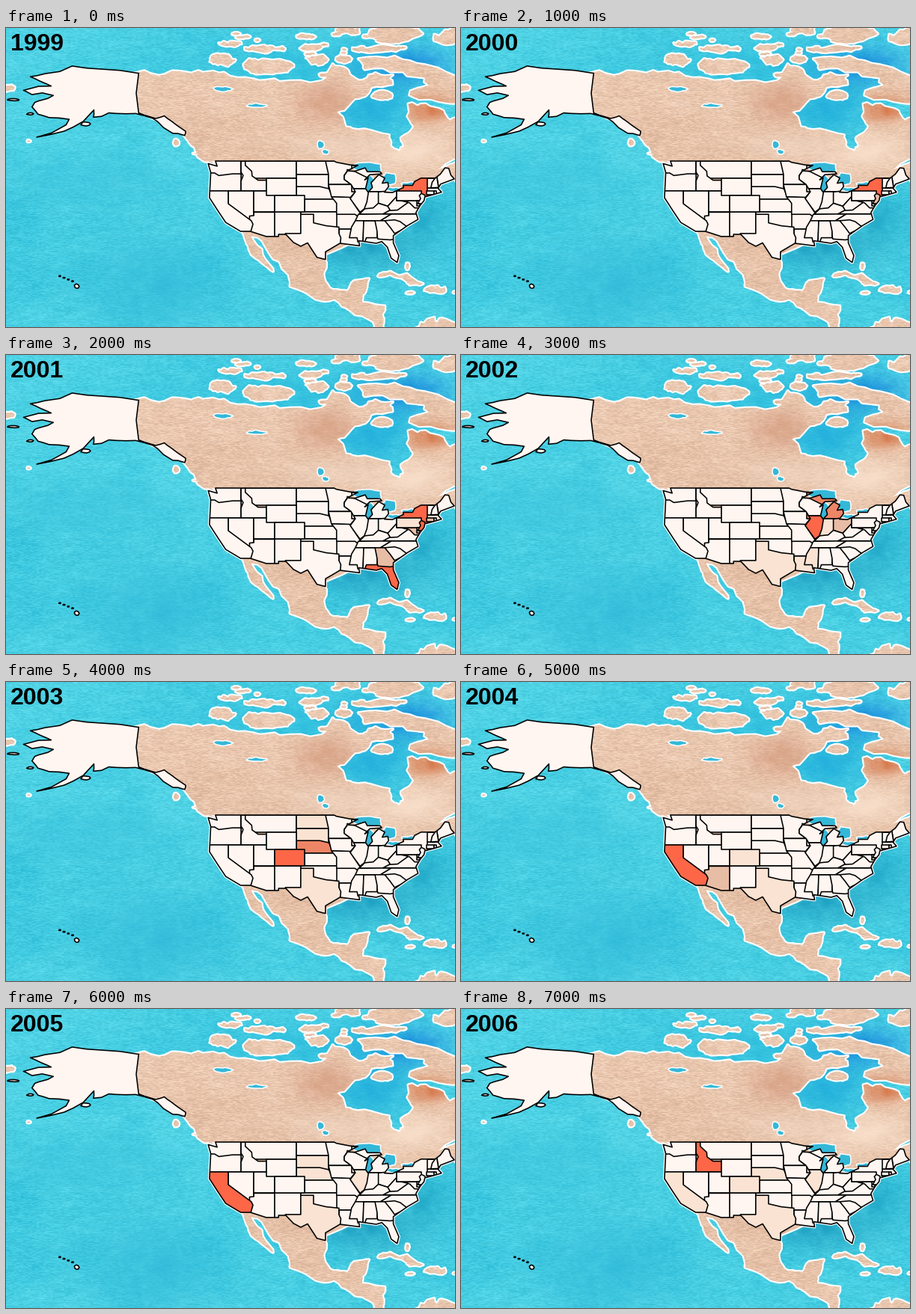
These frames come from a looping animation (600 px wide and 400 px high, 8 s). A matplotlib script:

```python
import numpy as np
import matplotlib.pyplot as plt
from matplotlib.animation import FuncAnimation
from matplotlib.patches import Polygon
from matplotlib.path import Path

W, H, DPI = 600, 400, 100
PX = 72 / DPI
SCALE = 5.7  # pixels per degree, both ways
rng = np.random.default_rng(7)

BASE, LIGHT, TAN, CORAL, RED = "#fff6f1", "#fae3d3", "#e8bda5", "#ee8566", "#fd6747"
YEARS = [
    (1999, {RED: "NY"}),
    (2000, {RED: "NY", TAN: "NJ"}),
    (2001, {RED: "NY NJ FL", TAN: "GA CT MD", LIGHT: "PA MA"}),
    (2002, {RED: "IL", CORAL: "MI", TAN: "OH", LIGHT: "IN LA MS TX"}),
    (2003, {RED: "CO", CORAL: "NE", LIGHT: "SD ND TX"}),
    (2004, {RED: "CA", TAN: "AZ", LIGHT: "CO TX"}),
    (2005, {RED: "CA", LIGHT: "IL SD TX NE"}),
    (2006, {RED: "ID", LIGHT: "TX CO CA NE IL"}),
]

fig = plt.figure(figsize=(W / DPI, H / DPI), dpi=DPI)
ax = fig.add_axes([0, 0, 1, 1])


def project(*coords):
    """Degrees west and north, in pairs, to stage pixels."""
    west, north = np.reshape(coords, (-1, 2)).T
    return np.column_stack([SCALE * (172.1 - west), 178 + SCALE * (49 - north)])


def oval(west, north, rx, ry, n=9):
    """Uneven ellipse around a place, in stage pixels."""
    a = np.linspace(0, 2 * np.pi, n, endpoint=False)
    r = rng.uniform(0.8, 1.15, n)
    ring = np.column_stack([rx * r * np.cos(a), ry * r * np.sin(a)])
    return project(west, north) + SCALE * ring


def roughen(p, levels=2, size=0.15, limit=2.5):
    """Closed outline with its edges split and shaken, wound one way."""
    x, y = p.T
    if np.sum(x * np.roll(y, -1) - y * np.roll(x, -1)) < 0:
        p = p[::-1]
    for _ in range(levels):
        step = np.roll(p, -1, axis=0) - p
        reach = np.minimum(np.hypot(*step.T) * size, limit)
        mid = p + step / 2 + rng.normal(0, 0.7, p.shape) * reach[:, None]
        p = np.stack([p, mid], axis=1).reshape(-1, 2)
    return p


def noise(rows, cols):
    """Smooth random field in 0..1 over the stage."""
    grid = rng.random((rows, cols))
    x, y = np.linspace(0, cols - 1, W), np.linspace(0, rows - 1, H)
    wide = np.array([np.interp(x, np.arange(cols), r) for r in grid])
    return np.array([np.interp(y, np.arange(rows), c) for c in wide.T]).T


yy, xx = np.mgrid[0:H, 0:W]


def stain(img, x, y, rx, ry, color, strength):
    a = strength * np.exp(-((xx - x) / rx) ** 2 - ((yy - y) / ry) ** 2)
    a = (a * (0.7 + 0.6 * noise(40, 60)))[..., None]
    img[:] = img * (1 - a) + np.array(color) * a


def wash(dark, light, grain):
    t = (0.4 * noise(6, 8) + 0.3 * noise(20, 18) + 0.3 * noise(90, 45))[..., None]
    img = np.array(dark) * (1 - t) + np.array(light) * t
    return img + ((noise(H, 200) - 0.5) * grain)[..., None]


def show(img, z):
    return ax.imshow(np.clip(img, 0, 255).astype(np.uint8), extent=(0, W, H, 0),
                     interpolation="nearest", aspect="auto", zorder=z)


sea = wash((50, 194, 220), (96, 220, 234), 24)
stain(sea, 110, 205, 130, 35, (52, 190, 218), 0.4)
stain(sea, 200, 345, 90, 60, (46, 184, 216), 0.6)
stain(sea, 480, 295, 65, 28, (16, 146, 184), 0.6)
stain(sea, 555, 255, 40, 35, (24, 160, 194), 0.6)
stain(sea, 490, 105, 55, 35, (24, 168, 218), 0.7)
stain(sea, 530, 50, 60, 25, (10, 110, 220), 0.6)
stain(sea, 400, 50, 120, 35, (30, 180, 218), 0.5)
show(sea, 0)

ground = wash((222, 182, 154), (242, 212, 191), 30)
stain(ground, 565, 108, 34, 16, (212, 112, 64), 0.75)
stain(ground, 428, 100, 40, 26, (208, 146, 116), 0.6)
stain(ground, 540, 165, 65, 28, (250, 226, 206), 0.8)
stain(ground, 430, 155, 60, 18, (244, 220, 202), 0.5)
show_ground = show(ground, 2)

outlines = []


def land(points):
    shape = Polygon(roughen(points), fc="white", ec="white", lw=4.2 * PX,
                    joinstyle="round", zorder=1)
    ax.add_patch(shape)
    outlines.append(shape.get_path())


arctic = [142, 69.6, 135, 69.3, 127, 70.2, 121, 69.8, 114, 68.2, 108, 67.6, 98, 67.8,
          95.5, 71.8, 92.2, 70.6, 91, 68.9, 88, 68.2, 85.5, 69.7, 81.4, 69.2, 81.5, 67, 86.5, 66.3]
bay = [88, 64.2, 91, 63, 94.5, 60.5, 92.5, 57, 88, 56.5, 82.3, 55.1, 82, 52.9, 80, 51.3,
       78.8, 52.5, 79.3, 54.6, 76.5, 57, 78, 59.5, 77.8, 62.4, 73.7, 62.4, 69.6, 60.8,
       68, 58.5, 65, 60.2, 62, 56]
east = [60, 50, 67, 49.6, 71, 47, 66, 49, 62, 48, 62, 44.8, 66, 43.8, 67, 45,
        78, 40, 82, 34, 97.6, 27]
gulf = [97.4, 25.9, 97.5, 21.5, 95.5, 18.8, 92, 18.5, 90.5, 20.9, 87, 21.4, 88.5, 17.5,
        88.5, 15.8, 83.3, 15, 83.6, 11, 82, 9]
pacific = [85.5, 9, 86, 11.3, 91.5, 14, 94.5, 16.2, 98, 16.2, 105.5, 19.6, 105.8, 22.3,
           109.4, 26, 113.1, 31.2, 114.7, 31.7, 112, 27, 109.5, 23.1, 112.2, 25.2,
           115, 28, 115.8, 30, 117, 32.6, 122, 40, 123, 49, 127.5, 51, 130.2, 54.8,
           133.5, 58.5, 142, 60.5]
land(project(*arctic, *bay, *east, *gulf, *pacific))
# Baffin, Cuba, Vancouver, the Venezuelan coast
land(project(89.5, 73, 81, 73.6, 74, 71.6, 67, 69, 61, 66, 67, 66.4, 64, 62.8, 68, 62.6,
             77.5, 64.5, 73, 66.8, 74, 68.6, 79, 70, 88, 70.5))
land(project(84.9, 22, 82, 23.1, 77, 21.6, 74.3, 20.2, 77.5, 19.9, 78.3, 20.8, 82, 22.4))
land(project(128.3, 50.8, 125.3, 50.1, 123.4, 48.5, 125.5, 48.9))
land(project(77, 9, 74.8, 11.1, 71.7, 12.3, 71.2, 11, 70, 12.1, 65, 10.5, 65, 9))
for place in [(121.5, 72.8, 2.9, 1.3), (110.5, 71.1, 6, 1.9), (99, 72.8, 2.6, 1.1),
              (97.5, 69.2, 1.3, 0.5), (93, 73, 2, 0.9), (86, 75.3, 5.5, 0.8),
              (81, 78.9, 6, 2.3), (92, 79.7, 3.2, 1), (111, 75.4, 5, 0.7),
              (119.5, 76.5, 2.8, 0.6), (100.5, 75.7, 2.6, 0.7), (102, 78.2, 2.2, 0.5),
              (66.5, 78, 5, 1.9), (83.8, 64.5, 2.6, 1), (132.2, 53.4, 0.6, 0.8),
              (171.6, 66.1, 1.7, 0.7), (166.8, 53.7, 0.4, 0.2), (71.4, 18.9, 2.8, 0.8),
              (77.3, 18.1, 1, 0.3), (66.5, 18.2, 0.8, 0.25), (78, 24.3, 0.4, 0.8)]:
    land(oval(*place))
for _ in range(14):
    land(oval(rng.uniform(75, 120), rng.uniform(74, 79), rng.uniform(0.4, 1.2), 0.3))
show_ground.set_clip_path(Path.make_compound_path(*outlines), ax.transData)

# Great Lakes, then lakes of the north-west
for place in [(87.5, 47.5, 4, 1.1), (87, 43.7, 1.2, 2.2), (82.3, 44.8, 1.6, 1.6),
              (81, 42.3, 2, 0.6), (77.8, 43.6, 1.7, 0.4), (98.3, 52.8, 0.8, 1),
              (97.2, 51.2, 0.8, 0.6), (113.3, 62, 2.8, 0.4), (121.2, 65.9, 2.4, 0.6)]:
    ax.add_patch(Polygon(roughen(oval(*place), 1), fc="#34b8d8", ec="white",
                         lw=1.5 * PX, zorder=3))

states = {}
INK = dict(ec="black", lw=1.6 * PX, joinstyle="round")


def state(key, points, clip=None):
    """Later states cover the loose edges of earlier ones."""
    shape = ax.add_patch(Polygon(points, fc=BASE, zorder=4, **INK))
    if clip is not None:
        shape.set_clip_path(clip, ax.transData)
    states.setdefault(key, []).append(shape)


alaska = [141, 69.6, 150, 70.6, 156.6, 71.3, 163, 69.5, 166.4, 68.8, 164, 67.7, 161.5, 66.6,
          168, 65.6, 166, 64.6, 161, 64.4, 164.5, 63.1, 166, 61.7, 164.6, 60, 162, 59.2,
          157.3, 58.8, 158, 57.5, 164.9, 54.6, 158.5, 56, 154, 58.3, 151.5, 61, 151.6, 59.3,
          148, 60.3, 144, 60.1, 139.5, 59.6, 136.5, 58.2, 133, 55.5, 130.2, 55, 130, 56,
          133.5, 58.5, 135, 59.6, 137, 59, 141, 60.3]
state("AK", roughen(project(*alaska), 1, 0.08))
for place in [(153.4, 57.7, 1.1, 0.5), (170.3, 63.4, 1.4, 0.25), (166.4, 60.1, 0.8, 0.25)]:
    state("AK", oval(*place))
state("HI", oval(155.5, 19.6, 0.6, 0.6, 7))
for i in range(4):
    state("HI", oval(156.5 + i, 20.8 + 0.4 * i, 0.25, 0.12, 6))

north = [123, 49, 95.2, 49, 94.6, 48.7, 91.5, 48.1, 89.6, 48, 92.1, 46.7, 90.4, 46.6,
         87.9, 47.4, 87.4, 46.5, 84.4, 46.5, 84, 46, 86.8, 45.8, 88, 44.6, 87.2, 45.1,
         87.8, 42.5, 87.2, 41.7, 86.2, 42.8, 86.5, 43.9, 85.5, 45, 84.7, 45.8, 83.3, 45,
         83.9, 43.8, 82.6, 44, 82.4, 43, 83.4, 41.7, 81.5, 41.6, 78.9, 42.8, 79, 43.3,
         76.8, 43.3, 76.3, 44.2, 74.8, 45, 71.5, 45, 70.3, 45.9, 69.2, 47.4, 68.3, 47.3,
         67.8, 45.7]
atlantic = [67, 44.8, 70.2, 43.6, 70.8, 42.6, 70, 41.7, 72, 41.1, 73.9, 40.6, 74.1, 39.7,
            75, 38.6, 76, 36.9, 75.5, 35.3, 77.9, 33.9, 81.3, 31.5, 81.3, 29.8, 80, 26.8,
            80.4, 25.2, 81.8, 26.2, 82.7, 28.8, 84, 30.1, 85.3, 29.7, 89.4, 30.3, 89.2, 29.1]
south = [93.8, 29.7, 97.2, 27.7, 97.2, 25.9, 99.2, 26.4, 101.4, 29.8, 103, 29, 104.7, 29.9,
         106.5, 31.8, 108.2, 31.8, 108.2, 31.3, 111.1, 31.3, 114.8, 32.5, 117.1, 32.5,
         120.6, 34.6, 122.4, 37.3, 124.4, 40.4, 124.1, 46.3, 124.7, 48.4, 122.6, 47.8]
border = project(*north, *atlantic, *south)
ax.add_patch(Polygon(border, fc="white", ec="white", lw=4 * PX, joinstyle="round", zorder=1))
ax.add_patch(Polygon(border, fc="none", zorder=5, **INK))
country = Path(border)


def inner(key, *coords):
    state(key, project(*coords), country)


def box(key, west, top, right, bottom):
    inner(key, west, top, right, top, right, bottom, west, bottom)


# West
box("WA", 126, 50, 117, 45)
box("MT", 117, 49, 104, 45)
inner("OR", 126, 46.2, 123.2, 46.2, 122.2, 45.6, 119, 46, 117, 46, 117, 42, 126, 42)
inner("ID", 117, 49, 116, 49, 116, 48, 114.5, 46.6, 114.4, 45.5, 113, 44.5, 111, 44.5,
      111, 42, 117, 42, 117, 44.3, 116.5, 45.6, 117, 46.4)
box("NV", 120, 42, 114, 35)
box("UT", 114, 42, 109.05, 37)
inner("AZ", 114, 37, 109.05, 37, 109.05, 31, 115, 31, 115, 36.1, 114, 36.2)
inner("CA", 126, 42, 120, 42, 120, 39, 114.6, 35, 114.2, 34.2, 114.7, 32.5, 118, 31, 126, 34)
# Plains
box("ND", 104, 49, 96.5, 45.9)
box("SD", 104, 45.9, 96.5, 42)
inner("NE", 104, 43, 98.5, 43, 96.4, 42.5, 95.3, 40, 104, 40)
box("WY", 111, 45, 104, 41)
box("KS", 102.05, 40, 94.6, 37)
box("NM", 109.05, 37, 103, 31)
box("OK", 103, 37, 94.45, 33)
box("CO", 109.05, 41, 102.05, 37)
inner("MN", 97.2, 49, 96.5, 45.9, 96.5, 43.5, 91.2, 43.5, 92.8, 44.7, 92.8, 45.6,
      92.1, 46.7, 89, 48, 92, 49)
inner("IA", 96.5, 43.5, 91.2, 43.5, 90.2, 41.8, 91.4, 40.4, 95.8, 40.6)
box("AR", 94.5, 36.5, 89.7, 33)
inner("MO", 95.8, 40.6, 91.5, 40.5, 90.2, 38.5, 89.1, 36.8, 89.6, 36, 90.3, 36.5,
      94.6, 36.5, 94.6, 39.1)
box("LA", 94.05, 33, 88.5, 28)
inner("TX", 103, 36.5, 100, 36.5, 100, 34.5, 97, 33.8, 94.05, 33.5, 94.05, 32, 93.6, 31,
      93.8, 29, 97, 25, 107, 29, 106.6, 32, 103, 32)
# Middle
box("MI", 91, 48, 82, 41.75)
inner("WI", 92.1, 47, 90.4, 46.6, 87.6, 45.2, 86.5, 45.2, 87, 42.5, 90.6, 42.5,
      91.2, 43.5, 92.8, 44.7, 92.8, 45.6, 92.1, 46.6)
box("IN", 88, 41.75, 84.8, 37.5)
inner("OH", 84.8, 41.75, 80.5, 42.2, 80.5, 40.6, 82.6, 38.4, 84.8, 39.1)
inner("KY", 89.3, 36.5, 88, 37.8, 86, 38, 84.8, 39.1, 82.6, 38.4, 82, 37.5, 83.7, 36.5)
inner("IL", 90.6, 42.5, 87, 42.5, 87.5, 39.4, 88.1, 37.8, 89.1, 37, 90.2, 38.5,
      91.4, 40.2, 90.2, 41.8)
# South
inner("TN", 89.5, 36.5, 81.7, 36.6, 84.3, 35, 90.2, 35)
inner("NC", 84.3, 35, 81.7, 36.6, 75, 36.6, 75, 33, 80, 33.5, 82, 35)
inner("MS", 90.2, 35, 88.2, 35, 88.4, 30, 89.6, 30, 89.8, 31, 91.6, 31, 91.1, 33.5)
inner("AL", 88.2, 35, 85, 35, 85, 30, 88.4, 30)
inner("GA", 85.6, 35, 83.1, 35, 80.5, 31.5, 80.5, 30, 85, 30, 85.1, 32.5)
inner("SC", 83.3, 35, 81, 35.2, 79.7, 34.8, 78, 33.5, 81, 32, 82, 33.4)
inner("FL", 87.6, 31, 85, 31, 84.9, 30.7, 82, 30.5, 80.5, 30.8, 79, 25, 83, 24, 88, 30)
# North-east
box("NY", 80, 45.2, 71.5, 40)
box("MD", 79.5, 39.7, 75, 37.9)
inner("VA", 83.7, 36.6, 82, 37.5, 78.3, 39.4, 77.5, 39.2, 76.3, 38, 75, 38, 75, 36.6)
inner("WV", 82.6, 38.4, 80.6, 40.6, 80.5, 39.7, 79.5, 39.7, 77.8, 39.3, 80.3, 37.5, 82, 37.4)
box("PA", 80.5, 42, 74.8, 39.7)
box("DE", 75.8, 39.7, 75, 38.5)
inner("NJ", 74.7, 41.4, 73.9, 41, 73.5, 39, 75.6, 39, 74.9, 40.2, 75.2, 40.9)
box("MA", 73.4, 42.7, 69, 41)
box("CT", 73.5, 42, 71.8, 41.1)
box("RI", 71.8, 42, 71.2, 41)
box("VT", 73.4, 45, 71.4, 42.7)
inner("ME", 71.2, 48, 66, 48, 66, 43, 70.7, 43, 71.1, 45.3)
inner("NH", 71.5, 45, 71.1, 45.3, 70.7, 42.8, 72.5, 42.7, 72.2, 44)

label = ax.text(6, 30, "", family="Liberation Sans", weight="bold", size=32 * PX,
                va="baseline", zorder=6)
ax.set(xlim=(0, W), ylim=(H, 0))
ax.axis("off")


def update(i):
    year, tints = YEARS[i]
    fills = {key: color for color, keys in tints.items() for key in keys.split()}
    for key, shapes in states.items():
        for shape in shapes:
            shape.set_facecolor(fills.get(key, BASE))
    label.set_text(str(year))
    return [label]


anim = FuncAnimation(fig, update, frames=len(YEARS), interval=1000, repeat=True, repeat_delay=0)
plt.show()
```
